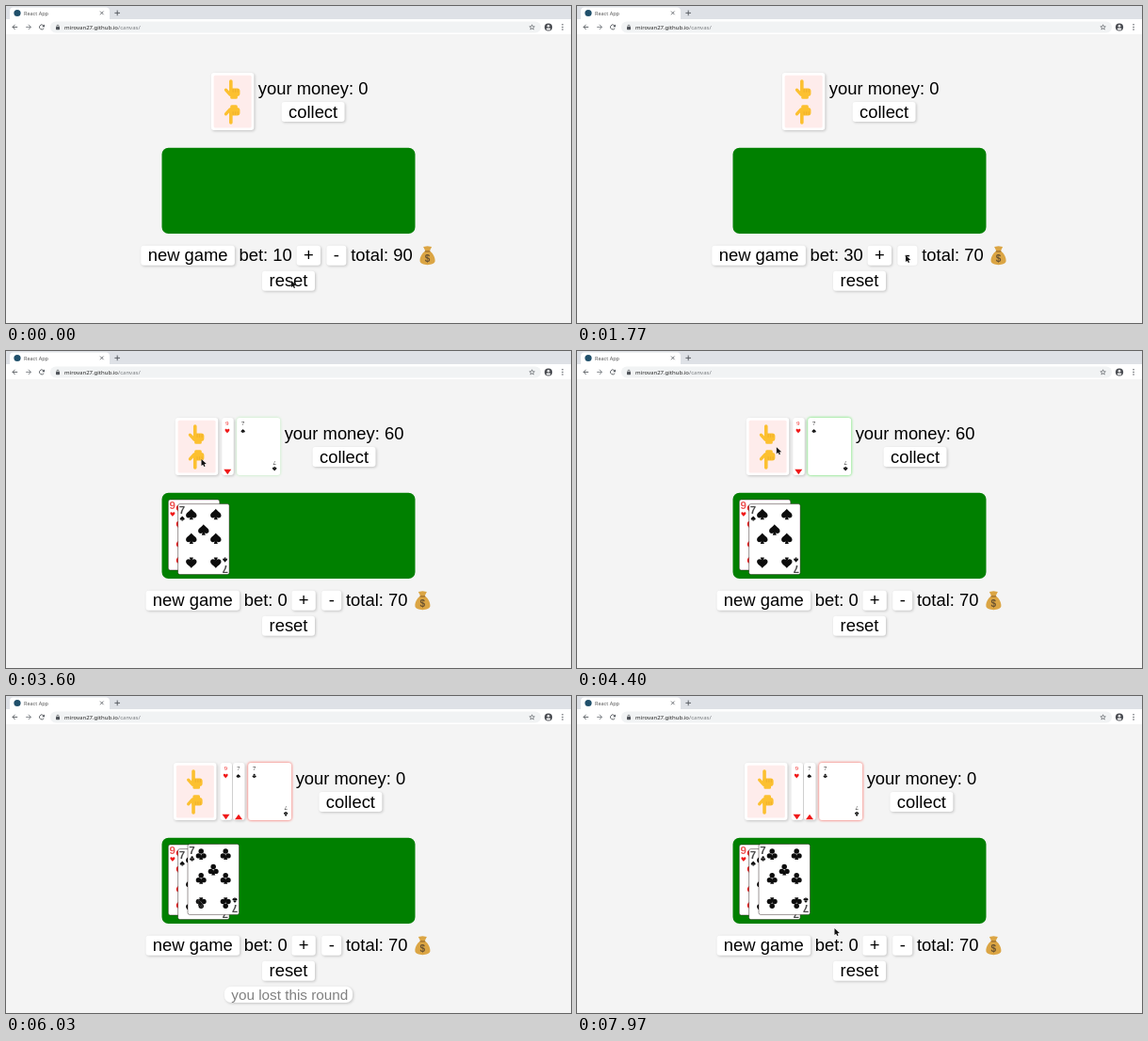
An HTML page with a canvas that plays this animation: 600 px wide and 337 px high, repeating every 8 s.

```html
<!DOCTYPE html>
<html lang="en">
<head>
<meta charset="utf-8">
<title>React App</title>
<style>
html, body { margin: 0; width: 100%; height: 100%; overflow: hidden; background: #f4f4f4; }
canvas { display: block; width: 600px; height: 337px; }
</style>
</head>
<body>
<canvas id="stage"></canvas>
<script>
const LOOP = 8000, W = 600, H = 337;
const canvas = document.getElementById('stage');
const c = canvas.getContext('2d');
const dpr = Math.max(1, window.devicePixelRatio || 1);
canvas.width = W * dpr;
canvas.height = H * dpr;

const SANS = '"Liberation Sans", Arial, sans-serif';
const UI = '"Noto Sans", sans-serif';
const SERIF = '"Liberation Serif", serif';
const RED = '#f01818', BLACK = '#0c0c0c', INK = '#50545a';
const SIZE = 18.4;

// pointer moves; bend pushes the middle of the way sideways
const MOVES = [
  { from: 570, to: 1000, x: 321, y: 266 },
  { from: 1550, to: 1700, x: 349, y: 265 },
  { from: 1800, to: 2130, x: 173, y: 266 },
  { from: 2700, to: 2850, x: 319.5, y: 75 },
  { from: 2870, to: 3300, x: 207.5, y: 115, bend: 70 },
  { from: 4330, to: 4730, x: 204, y: 86, bend: 6 },
  { from: 5870, to: 6330, x: 219, y: 266, bend: -14 },
  { from: 7770, to: 7970, x: 273.5, y: 247, bend: -30 }
];

const clamp = v => Math.min(1, Math.max(0, v));
const ease = v => 1 - (1 - clamp(v)) ** 3;
const fade = (t, a, b) => ease((t - a) / 200) * (1 - ease((t - b) / 200));
const between = (t, a, b) => t >= a && t < b;

function pointerAt(t) {
  let x = 303, y = 292;
  for (const m of MOVES) {
    if (t < m.from) break;
    const k = ease((t - m.from) / (m.to - m.from));
    x += (m.x - x) * k + (m.bend || 0) * Math.sin(Math.PI * k);
    y += (m.y - y) * k;
  }
  return [x, y];
}

function text(str, x, y, size, color = '#000', font = SANS, align = 'left', weight = '') {
  c.font = `${weight} ${size}px ${font}`;
  c.textAlign = align;
  c.fillStyle = color;
  c.fillText(str, x, y);
  return c.measureText(str).width;
}

function turned(str, x, y, size, color, font, weight) {
  c.save();
  c.translate(x, y);
  c.rotate(Math.PI);
  text(str, 0, size * .34, size, color, font, 'center', weight);
  c.restore();
}

function box(x, y, w, h, r, color) {
  c.beginPath();
  c.roundRect(x, y, w, h, r);
  c.fillStyle = color;
  c.fill();
}

function panel(x, y, w, h, glow = 'rgba(0,0,0,.2)', off = 1, r = 3) {
  c.save();
  c.shadowColor = glow;
  c.shadowBlur = 3 * dpr;
  c.shadowOffsetX = c.shadowOffsetY = off * dpr;
  box(x, y, w, h, r, '#fff');
  c.restore();
}

function button(label, x, y, w, pressed) {
  panel(x, y, w, 21, pressed ? 'rgba(0,0,0,.08)' : undefined, pressed ? 0 : 1);
  text(label, x + w / 2, y + 16.5, SIZE, '#000', SANS, 'center');
}

function trace(pts) {
  c.beginPath();
  pts.forEach(([x, y]) => c.lineTo(x, y));
}

function line(color, width, ...pts) {
  trace(pts);
  c.strokeStyle = color;
  c.lineWidth = width;
  c.stroke();
}

function poly(color, ...pts) {
  trace(pts);
  c.fillStyle = color;
  c.fill();
}

function disc(x, y, r, color) {
  c.beginPath();
  c.arc(x, y, r, 0, 7);
  c.fillStyle = color;
  c.fill();
}

function arc(x, y, r, a, b, width) {
  c.beginPath();
  c.arc(x, y, r, a, b);
  c.strokeStyle = INK;
  c.lineWidth = width;
  c.stroke();
}

// ---- browser bar ----
function arrow(x, dir, color) {
  const y = 22.4, tip = x + dir * 2.6;
  line(color, .9, [x - dir * 2.6, y], [tip, y]);
  line(color, .9, [x, y - 2.6], [tip, y], [x, y + 2.6]);
}

function star(x, y) {
  const pts = Array.from({ length: 11 }, (_, i) => {
    const r = i % 2 ? 1.2 : 2.9, a = (i / 5 - .5) * Math.PI;
    return [x + r * Math.cos(a), y + r * Math.sin(a)];
  });
  line(INK, .6, ...pts);
}

function browser() {
  box(0, 0, W, 15, 0, '#dee1e6');
  box(4, 1.5, 106, 16, 4, '#fff');
  box(0, 14, W, 16, 0, '#fff');
  disc(12, 7.5, 3.6, '#20506b');
  text('React App', 19, 9.6, 5.5, '#555', UI);
  line(INK, .8, [100, 5.6], [103.6, 9.2]);
  line(INK, .8, [103.6, 5.6], [100, 9.2]);
  line(INK, .9, [115.4, 7.4], [121, 7.4]);
  line(INK, .9, [118.2, 4.6], [118.2, 10.2]);

  arrow(9.6, -1, INK);
  arrow(23.8, 1, '#777b80');
  arc(38, 22.4, 2.5, .5, 5.6, .9);
  poly(INK, [41, 19.4], [41, 22.2], [38.2, 22.2]);

  box(47, 16.6, 521, 11.8, 5.9, '#f1f3f4');
  box(53, 21.8, 4, 3.4, .4, INK);
  arc(55, 21.4, 1.2, Math.PI, 0, .7);
  const w = text('mirovan27.github.io', 62, 24.6, 6, '#222', UI);
  text('/canvas/', 62 + w, 24.6, 6, '#75787c', UI);
  star(558.6, 22.7);
  disc(576, 22.5, 4.1, '#4a4d52');
  disc(576, 21.2, 1.3, '#fff');
  box(573.8, 23.4, 4.4, 2, 1, '#fff');
  for (let i = -1; i < 2; i++) disc(591, 22.4 + i * 2.7, .75, INK);
}

// ---- pictograms ----
function hand(x, y, down) {
  const skin = '#fcc030', edge = '#e8a62a';
  c.save();
  c.translate(x, y);
  if (down) c.scale(1, -1);
  c.lineCap = 'round';
  line(skin, 3.2, [-7, .6], [-2.5, 5.5]);
  box(-3.6, -1, 11.6, 8.4, 3, skin);
  box(-2.2, 5, 7.6, 5.2, 1.5, skin);
  box(-3.4, -10.4, 3.6, 13, 1.8, skin);
  for (let i = 0; i < 3; i++) line(edge, .6, [.7 + i * 2.5, 0], [.7 + i * 2.5, 2.8]);
  c.restore();
}

function deck(x) {
  panel(x, 71, 45.5, 61);
  box(x + 2.8, 73.8, 40, 55.6, 1.5, '#feeceb');
  hand(x + 22.6, 88.6);
  hand(x + 22.6, 115.4, true);
}

function moneyBag(x) {
  const gold = '#dba544';
  c.beginPath();
  c.moveTo(x, 259);
  c.bezierCurveTo(x - 5, 261, x - 8.4, 267, x - 8, 271);
  c.bezierCurveTo(x - 8, 276.5, x + 8, 276.5, x + 8, 271);
  c.bezierCurveTo(x + 8.4, 267, x + 5, 261, x, 259);
  c.fillStyle = gold;
  c.fill();
  poly(gold, [x - 2, 261], [x - 4.5, 256], [x, 255.2], [x + 4.5, 256], [x + 2, 261]);
  line('#9a6a2c', 1.2, [x - 2.8, 260.9], [x + 2.8, 260.9]);
  text('$', x, 272.2, 10, '#6a5230', SANS, 'center', 'bold');
}

// ---- cards ----
function heart(color) {
  c.beginPath();
  c.moveTo(0, .5);
  for (const s of [-1, 1]) {
    c.moveTo(0, .5);
    c.bezierCurveTo(s * .15, .22, s * .5, .08, s * .5, -.2);
    c.bezierCurveTo(s * .5, -.53, s * .1, -.56, 0, -.24);
  }
  c.fillStyle = color;
  c.fill('nonzero');
}

function suit(kind, x, y, size, flip) {
  c.save();
  c.translate(x, y);
  c.scale(size, flip ? -size : size);
  if (kind === 'heart') heart(RED);
  else poly(BLACK, [0, 0], [.18, .5], [-.18, .5]);
  if (kind === 'spade') {
    c.translate(0, -.07);
    c.scale(1, -.87);
    heart(BLACK);
  }
  if (kind === 'club') {
    for (let i = 0; i < 3; i++) {
      const a = (i * 2 / 3 - .5) * Math.PI;
      disc(.28 * Math.cos(a), .28 * Math.sin(a) - .01, .24, BLACK);
    }
  }
  c.restore();
}

function corner({ rank, kind }, x, ink) {
  text(rank, x, 79.2, 6.4, ink, SERIF, 'center');
  suit(kind, x, 85, kind === 'heart' ? 4.8 : 4.2);
}

function handCard(card, x, ink, glow) {
  panel(x, 71, 46, 61, glow, glow ? 0 : 1);
  corner(card, x + 6.5, ink);
  turned(card.rank, x + 40, 118.8, 6.4, ink, SERIF);
  suit(card.kind, x + 40, 125.3, 4.5, true);
}

function strip(card, x) {
  const red = card.kind === 'heart';
  panel(x, 71, 12.5, 61);
  corner(card, x + 5.7, red ? RED : '#333');
  const mid = 128.5, h = red ? 2.7 : -2.7;
  poly(RED, [x + 2, mid - h], [x + 10, mid - h], [x + 6, mid + h]);
}

function boardCard({ rank, kind, x, y, rows, mid }) {
  const ink = kind === 'heart' ? '#ee5555' : '#4a4a4a';
  box(x, y, 54.5, 75, 2, '#fff');
  c.strokeStyle = 'rgba(20,0,0,.6)';
  c.lineWidth = .7;
  c.stroke();
  for (let i = 0; i < rows; i++) {
    const py = y + 11 + i * 51.5 / (rows - 1);
    for (const px of [14.2, 40.2]) suit(kind, x + px, py, 11.4, i >= rows / 2);
  }
  suit(kind, x + 27.2, y + mid, 11.4);
  text(rank, x + 4.4, y + 10.4, 11.5, ink, SANS, 'center', 'bold');
  suit(kind, x + 4.6, y + 15.5, 5);
  turned(rank, x + 50.1, y + 69, 11.5, ink, SANS, 'bold');
  suit(kind, x + 50, y + 59.5, 5, true);
}

const CARDS = [
  { rank: '9', kind: 'heart', x: 172.3, y: 158, rows: 4, mid: 19.2 },
  { rank: '7', kind: 'spade', x: 182.6, y: 162.6, rows: 3, mid: 27.5 },
  { rank: '7', kind: 'club', x: 193, y: 157.4, rows: 3, mid: 27.5 }
];
const DEALT = [2230, 3600, 4870];

// the row is centred: deck, covered cards as strips, newest card, money
function topRow(t, n, money) {
  const label = 'your money: ' + money;
  c.font = `${SIZE}px ${SANS}`;
  const w = c.measureText(label).width;
  const held = n ? 52.2 + 13.7 * (n - 1) : 0;
  const x = 301.1 - (50 + held + w) / 2, edge = x + 45.5;

  deck(x);
  for (let i = 0; i < n - 1; i++) strip(CARDS[i], edge + 4 + 13.5 * i);
  if (n) {
    const k = ease((t - DEALT[n - 1]) / 200);
    const glow = [
      undefined,
      `rgba(70,225,70,${.35 + .65 * k})`,
      `rgb(${60 + 190 * k},${240 - 170 * k},60)`
    ][n - 1];
    handCard(CARDS[n - 1], edge + held - 46, n === 1 ? '#7a4444' : '#111', glow);
  }
  const left = edge + held + 4.5;
  text(label, left, 94.4, SIZE);
  button('collect', left + w / 2 - 33.5, 102, 67);
}

function board(n) {
  box(165.5, 150.8, 269, 91.2, 7, '#008000');
  CARDS.slice(0, n).forEach(boardCard);
}

function controls(t, n) {
  const plus = [1000, 1330, 1500];
  const bet = n ? 0 : 10 + 10 * plus.filter(p => p <= t).length - (t >= 1740 ? 10 : 0);
  const total = n ? 70 : 100 - bet;
  const s = n ? 5.2 : 0;
  button('new game', 143.3 + s, 254.8, 99.6, between(t, 2150, 2230));
  text('bet: ' + bet, 247.5 + s, 271.3, SIZE);
  button('+', 308.6 - s, 254.8, 25.4, plus.some(p => between(t, p - 60, p)));
  button('-', 340.4 - s, 254.8, 21, between(t, 1690, 1800));
  text('total: ' + total, 366.2 - s, 271.3, SIZE);
  moneyBag(447.6 - s);
  button('reset', 272, 281.8, 56);
}

function message(str, alpha) {
  if (alpha <= 0) return;
  c.font = `15.3px ${SANS}`;
  const w = c.measureText(str).width + 12;
  c.save();
  c.globalAlpha = alpha;
  panel(300 - w / 2, 308.8, w, 17.2, undefined, 1, 7);
  text(str, 301.3, 322.8, 15.3, '#808080', SANS, 'center');
  c.restore();
}

function pointer([x, y]) {
  c.save();
  c.translate(x, y);
  c.scale(.88, .88);
  trace([[0, 0], [0, 8], [1.9, 6.4], [3.3, 9.2], [4.6, 8.6], [3.4, 6], [6, 5.8]]);
  c.closePath();
  c.lineWidth = .7;
  c.strokeStyle = 'rgba(255,255,255,.6)';
  c.stroke();
  c.fillStyle = '#111';
  c.fill();
  c.restore();
}

function draw(t) {
  c.setTransform(dpr, 0, 0, dpr, 0, 0);
  box(0, 0, W, H, 0, '#f4f4f4');
  browser();
  const n = DEALT.filter(d => d <= t).length;
  topRow(t, n, n < 3 ? 30 * n : 0);
  board(n);
  controls(t, n);
  message('you lost this round', fade(t, 4870, 6070));
  message("bet can't be zero", fade(t, 6600, 7770));
  pointer(pointerAt(t));
}

const start = performance.now();
function tick() {
  draw((performance.now() - start) % LOOP);
  requestAnimationFrame(tick);
}
tick();
</script>
</body>
</html>
```
